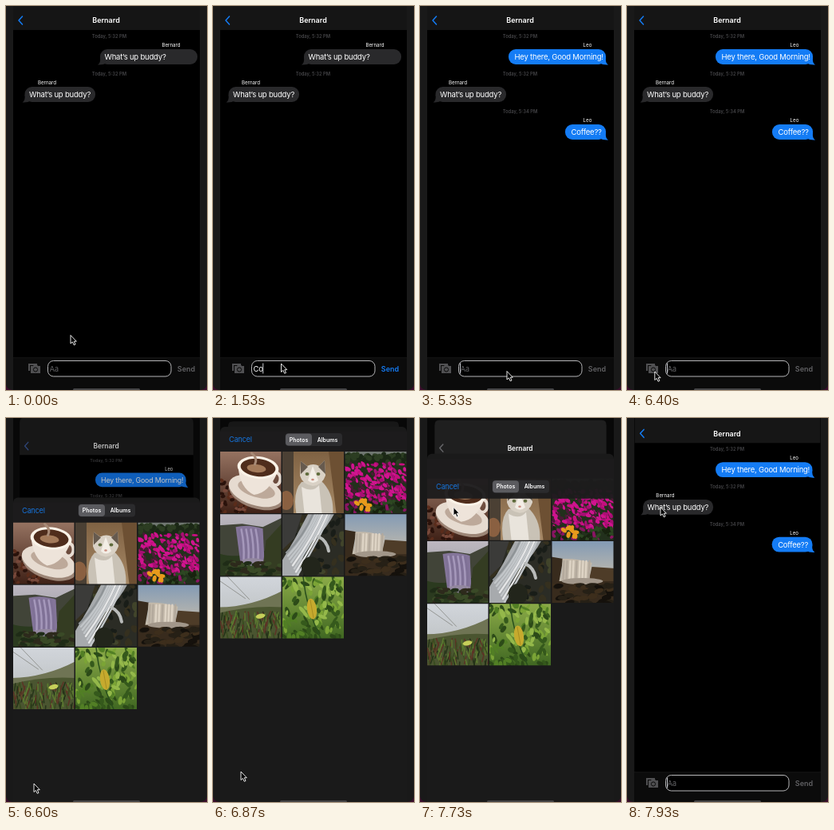
An HTML page for the animation above (8 s loop, 252 by 480 pixels).

```html
<!DOCTYPE html>
<html lang="en">
<head>
<meta charset="utf-8">
<title>Chat</title>
<style>
  html, body { margin: 0; width: 100%; height: 100%; overflow: hidden; background: #191919; }
  svg { display: block; }
  text { font-family: Inter, Roboto, sans-serif; fill: #fff; white-space: pre; }
  .body { font-size: 9.5px; letter-spacing: -.2px; }
  .link { font-size: 9.2px; letter-spacing: -.25px; fill: #1674dc; }
  .name { font-size: 6.2px; text-anchor: middle; }
  .date { font-size: 5.8px; font-weight: 600; fill: #444447; text-anchor: middle; }
  .bold { font-size: 9px; font-weight: 600; text-anchor: middle; }
  .tab { font-size: 7px; font-weight: 600; text-anchor: middle; }
  .photo { filter: blur(.5px); }
</style>
</head>
<body>
<svg id="stage" width="252" height="480" viewBox="0 0 252 480"></svg>
<script>
const FRIEND = 'Bernard', ME = 'Leo', BLUE = '#147cf5', GRAY = '#29292b';
const LOOP = 8000, STEP = 1000 / 15, SENT = 4733, PRESENT = 6447, DISMISS = 7712;

let seed = 7;
const rnd = (a, b) => a + (b - a) * ((seed = seed * 16807 % 2147483647) / 2147483647);
const pick = (...list) => list[Math.floor(rnd(0, list.length))];
const many = (n, draw) => Array.from({ length: n }, (_, i) => draw(i)).join('');
const text = (cls, x, y, s, extra = '') => `<text class="${cls}" x="${x}" y="${y}" ${extra}>${s}</text>`;
const shape = (d, fill) => `<path d="${d}" fill="${fill}"/>`;
const line = (d, color, w) => `<path d="${d}" fill="none" stroke="${color}" stroke-width="${w}" stroke-linecap="round"/>`;
const oval = (x, y, rx, ry, fill, turn = 0) =>
  `<ellipse cx="${x}" cy="${y}" rx="${rx}" ry="${ry}" fill="${fill}" transform="rotate(${turn} ${x} ${y})"/>`;
const box = (x, y, w, h, fill, r = 0, extra = '') =>
  `<rect x="${x}" y="${y}" width="${w}" height="${h}" rx="${r}" fill="${fill}" ${extra}/>`;
const back = fill => box(-4, -4, 85, 85, fill);

function bubble(x, y, w, label, fill, mine) {
  const tail = 'M0 10Q1 17-3 19.5Q4 20 8 17Z';
  const place = mine ? `translate(${x + w} ${y}) scale(-1 1)` : `translate(${x} ${y})`;
  return box(x, y, w, 19, fill, 9) + `<path d="${tail}" fill="${fill}" transform="${place}"/>` +
    text('body', x + (mine ? 7.5 : 5.5), y + 13, label);
}

const fade = (id, a, b) =>
  `<linearGradient id="${id}" x2="0" y2="1"><stop stop-color="${a}"/><stop offset="1" stop-color="${b}"/></linearGradient>`;

const photos = [
  // coffee
  () => back('url(#brown)') +
    many(70, () => oval(rnd(0, 34), rnd(36, 77), 3, 2, pick('#2a120b', '#5a2c1b', '#77483a'), rnd(0, 180))) +
    oval(46, 52, 36, 19, '#9c8576', 18) + oval(45, 49, 35, 18, '#e6dbd0', 18) + oval(46, 47, 24, 10, '#bda99a', 16) +
    '<ellipse cx="70" cy="34" rx="6" ry="8" fill="none" stroke="#e8ddd3" stroke-width="4"/>' +
    shape('M23 18Q25 46 43 54Q62 52 73 24Z', '#eee4da') + oval(48, 20, 26, 14, '#fbf3e8', 6) +
    oval(48, 20, 22, 11, '#4f2d1c', 6) + oval(46, 21, 12, 5, '#a37a5a', 6) + line('M40 2Q48 8 44 16', '#a78a76', 3),
  // cat
  () => back('url(#tan)') + box(-4, -4, 18, 85, '#4b4034') + shape('M58 0H81V81H68Z', '#6d5033') +
    shape('M18 81Q12 50 24 38L48 36Q66 52 63 81Z', '#c9c2b6') + shape('M24 44Q38 52 46 42L50 81H28Z', '#e9e4dc') +
    shape('M23 12L31 18Q39 14 46 18L53 11L54 30Q50 42 38 43Q25 41 22 30Z', '#d9d1c5') +
    shape('M23 12L32 19L23 28ZM53 11L45 19L54 28Z', '#665a4e') + shape('M38 18L32 36Q38 42 45 36Z', '#f3eee6') +
    oval(31, 28, 2.4, 2, '#5f6b3c') + oval(45, 28, 2.4, 2, '#5f6b3c') + oval(38, 35, 1.8, 1.2, '#c98d80') +
    oval(5, 61, 9, 12, '#8a6041'),
  // flowers
  () => back('#22301c') + box(-4, -4, 85, 9, '#6f7670') +
    many(60, () => oval(rnd(0, 77), rnd(4, 16), 4, 3, pick('#2c3d22', '#1b2816'), rnd(0, 180))) +
    many(220, () => oval(rnd(0, 77), rnd(15, 62), rnd(2, 4), rnd(1.2, 2.4), pick('#d0148f', '#a80e74', '#c5107f', '#4a1a35'), rnd(0, 90))) +
    many(60, () => oval(rnd(0, 77), rnd(62, 77), 4, 2, pick('#2d4722', '#8a1463', '#18230f'), rnd(0, 180))) +
    many(9, () => oval(rnd(13, 31), rnd(60, 72), 4, 2.5, '#e79a1c', rnd(0, 180))),
  // tall fall
  () => back('url(#sky)') + shape('M-4 14L28 12L54 16L81 3V81H-4Z', '#414438') +
    shape('M-4 48Q30 60 81 36V81H-4Z', '#2b3a1f') + shape('M20 16Q36 12 54 18L56 58L26 62Z', '#84759a') +
    many(9, i => line(`M${24 + i * 3} 19Q${28 + i * 3} 38 ${27 + i * 3} 57`, i % 2 ? '#a598bb' : '#7f7196', 2.4)) +
    oval(41, 60, 16, 5, '#93889f') + shape('M52 81L58 33L81 8V81Z', '#343c22') +
    many(50, () => oval(rnd(0, 77), rnd(60, 78), 5, 2.5, pick('#1f2c17', '#3a4a27', '#2d2a1c'), rnd(-30, 30))),
  // streams
  () => back('#2b2c25') +
    many(70, () => oval(rnd(0, 77), rnd(0, 77), 5, 3, pick('#41442b', '#191d18', '#35301f'), rnd(0, 180))) +
    shape('M34 -4H67Q56 17 42 30Q24 44 20 81H-4V64Q17 30 34 -4Z', '#a7aaad') +
    many(8, i => line(`M${40 + i * 3} -4Q${27 + i * 3} 28 ${5 + i * 2} ${48 + i * 4}`, pick('#e4e5e6', '#c2c6c9', '#8f9497'), 2.4)) +
    line('M45 28Q56 33 58 46', '#b9bbba', 4) + shape('M-4 -4H26L15 30L-4 48Z', '#3b3b39') + oval(36, 66, 12, 13, '#22251b'),
  // sunset fall
  () => back('url(#sunset)') + shape('M-4 19L14 22L9 50L81 46V81H-4Z', '#382b1d') +
    shape('M50 32L81 34V50H46Z', '#4e3c28') + shape('M13 22Q30 21 50 27L46 49H12Z', '#c3b9aa') +
    many(9, i => line(`M${15 + i * 4} 25L${14 + i * 4} 47`, pick('#ded4c5', '#b3a99c'), 2.4)) +
    oval(38, 50, 26, 4, '#a2978a') +
    many(50, () => oval(rnd(0, 77), rnd(55, 78), 6, 3, pick('#15110c', '#3d2e1c', '#262016'), rnd(-20, 20))),
  // meadow
  () => back('url(#haze)') + line('M0 5L32 27M10 0L37 28', '#7b7d78', .7) + shape('M-4 38Q40 38 81 16V81H-4Z', '#6f7454') +
    shape('M-4 46Q38 35 81 38V81H-4Z', '#4a5530') +
    many(130, () => { const x = rnd(0, 77), y = rnd(52, 82);
      return line(`M${x} ${y}l${rnd(-4, 4)} -9`, pick('#5c3426', '#5c7a30', '#26331a', '#3a4d20'), 1.5); }) +
    oval(51, 49, 6, 3, '#c6cf5a', -12),
  // leaves
  () => back('url(#green)') +
    many(120, () => oval(rnd(0, 77), rnd(0, 77), rnd(3, 7), rnd(1.5, 3.2),
      pick('#7ba436', '#35591c', '#94b84a', '#527f25', '#2c4a18'), rnd(20, 130))) +
    line('M26 0Q30 40 48 77', '#294f1c', 1.5) + oval(37, 40, 6, 13, '#c6aa2e', -8) + line('M35 29L39 51', '#a0861f', .8)
];

const stage = document.getElementById('stage');
stage.innerHTML = `
<defs>
  <clipPath id="screen">${box(9, 0, 234, 480, '#000')}</clipPath>
  ${fade('brown', '#9a7765', '#3b1d13')}${fade('tan', '#7d6041', '#a98b68')}${fade('green', '#8fae4a', '#3c6420')}
  ${fade('sky', '#bfb9c2', '#898f94')}${fade('haze', '#d3d7dd', '#b3b7b6')}${fade('sunset', '#7e98b5', '#efd2a8')}
</defs>
${box(0, 0, 252, 480, '#191919')}
<g clip-path="url(#screen)">
  ${box(9, 0, 234, 480, '#080808')}
  <g id="page">
    ${box(9, -20, 234, 560, '#000', 7)}
    <g id="table">
      ${text('date', 125.5, 40, 'Today, 5:32 PM')}${text('date', 125.5, 87, 'Today, 5:32 PM')}
      <g id="before">${text('name', 203, 51, FRIEND)}${bubble(114, 54, 122, 'What’s up buddy?', GRAY)}</g>
      <g id="after">
        ${text('name', 210, 51, ME)}${bubble(111, 54, 122, 'Hey there, Good Morning!', BLUE, true)}
        <g id="reply">${text('date', 125.5, 134, 'Today, 5:34 PM')}${text('name', 210, 145, ME)}
        ${bubble(182, 148, 51, 'Coffee??', BLUE, true)}</g>
      </g>
      ${text('name', 47.5, 98, FRIEND)}${bubble(19.5, 101, 88.5, 'What’s up buddy?', GRAY)}
    </g>
    <path id="nav" d="M9 30V-13Q9-20 16-20H236Q243-20 243-13V30Z"/>
    <path id="arrow" d="M20.5 13L16 18L20.5 23" fill="none" stroke="${BLUE}" stroke-width="1.5" stroke-linecap="round" stroke-linejoin="round"/>
    ${text('bold', 125.5, 21.3, FRIEND)}
    ${box(9, -20, 234, 560, '#000', 7, 'id="dim"')}
  </g>
  <g id="bar">
    ${box(5, 440, 250, 44, '#0b0b0b')}${box(5, 439.5, 250, .6, '#202020')}
    <g fill="#505052">
      <path d="M24 447H35V449H26V456H24Z"/><path d="M27 450H30L31 448.5H35L36 450H39V459H27Z"/>
      <circle cx="33" cy="454.5" r="2.6" fill="#505052" stroke="#0b0b0b"/>
    </g>
    ${box(48.5, 443.5, 154.5, 19.5, '#000', 7, 'stroke="#c9c9cb" stroke-width=".9"')}
    ${text('body', 50.5, 456.5, '', 'id="field"')}
    ${box(50, 446.5, 1, 13, '#c8cad0', 0, 'id="caret"')}
    ${text('bold', 222, 456.7, 'Send', 'id="send"')}
  </g>
  <g id="sheet">
    ${box(9, 0, 234, 520, '#1a1a1a', 6)}
    ${photos.map((draw, i) => `<svg x="${8.5 + i % 3 * 78.5}" y="${31 + Math.floor(i / 3) * 78.3}" width="77" height="77"><g class="photo">${draw()}</g></svg>`).join('')}
    ${box(9, 6, 234, 25, '#1d1c1d', 0, 'id="head" fill-opacity=".96"')}
    <g id="tools">
      ${text('link', 20, 3.5, 'Cancel')}
      ${box(90.5, -8, 71.5, 16, '#2b2b2d', 4)}${box(91, -7.5, 33, 15, '#5b5b5f', 4)}
      ${text('tab', 107.5, 2.6, 'Photos')}${text('tab', 143.5, 2.6, 'Albums')}
    </g>
  </g>
</g>
<path d="M0 473Q1 479 8 480H0ZM252 473Q251 479 244 480H252Z" fill="#3a0d2b"/>
${box(84, 478, 84, 3, '#444446', 1.5)}
<path id="cursor" d="M0 0V10.5L2.4 8.4L4.2 12.3L6 11.5L4.3 7.7H7.3Z" fill="#000" stroke="#fff" stroke-width=".9" stroke-linejoin="round"/>`;

const $ = {};
stage.querySelectorAll('[id]').forEach(e => $[e.id] = e);
const set = (id, name, value) => $[id].setAttribute(name, value);
const move = (id, x, y, more = '') => set(id, 'transform', `translate(${x} ${y})${more}`);
const show = (id, on) => set(id, 'opacity', +on);

const spring = (t, rate = .02) => t <= 0 ? 0 : 1 - (1 + rate * t) * Math.exp(-rate * t);
const clamp = v => Math.min(1, Math.max(0, v));

// time, x, y of the pointer tip
const path = [[0, 81, 411.5], [66, 81, 411.5], [200, 85.5, 447], [4000, 85.5, 447], [4530, 222, 452], [5130, 222, 452],
  [5333, 109, 456.5], [5900, 34, 457], [6600, 35, 457], [6867, 35, 442], [7300, 42, 111.5], [LOOP, 42, 111.5]];
function pointer(t) {
  const i = path.findIndex(p => p[0] > t), [t0, x0, y0] = path[i - 1], [t1, x1, y1] = path[i];
  const u = (t - t0) / (t1 - t0), k = u * u * (3 - 2 * u);
  return [x0 + (x1 - x0) * k, y0 + (y1 - y0) * k];
}
const keys = [1330, 1460, 1800, 1930, 2070, 2200, 3000, 3530];

function draw(now) {
  const t = Math.floor((now % LOOP + 5) / STEP) * STEP % LOOP;
  const slide = 4 * Math.max(0, 1 - t / 200) ** 1.5;
  const sent = t >= SENT - 1;
  const leaving = t >= DISMISS;
  const out = spring(t - DISMISS);
  const up = spring(t - PRESENT) * (1 - out);
  const top = leaving ? 10 + 505 * out : 480 - 470 * up;

  const scale = 1 - .085 * up, tone = 21 + 11 * up;
  move('page', 126, 18 + 21 * up, ` scale(${scale}) translate(-126 -18)`);
  move('table', slide, 0);
  move('bar', slide, leaving ? 3 : 0);
  show('before', !sent);
  show('after', sent);
  show('reply', clamp((t - SENT + 67) / 200));
  show('dim', leaving ? 0 : .3 * up);
  set('nav', 'fill', `rgb(${tone},${tone},${tone})`);
  set('arrow', 'stroke', up > .5 ? (leaving ? '#69696c' : '#3d5a9a') : BLUE);

  const typed = sent ? '' : 'Coffee??'.slice(0, keys.filter(k => t + 5 >= k).length);
  $.field.textContent = typed || 'Aa';
  $.field.style.fill = typed ? '#fff' : '#626265';
  $.send.style.fill = typed ? BLUE : '#626265';
  set('caret', 'x', 50 + (typed ? $.field.getComputedTextLength() : 0));
  show('caret', t > 795);

  show('sheet', up > 0);
  move('sheet', 0, top);
  set('head', 'height', leaving ? 50 : 25);
  move('tools', 0, leaving ? 41 : 16);
  move('cursor', ...pointer(t));
  requestAnimationFrame(draw);
}
requestAnimationFrame(draw);
</script>
</body>
</html>
```
